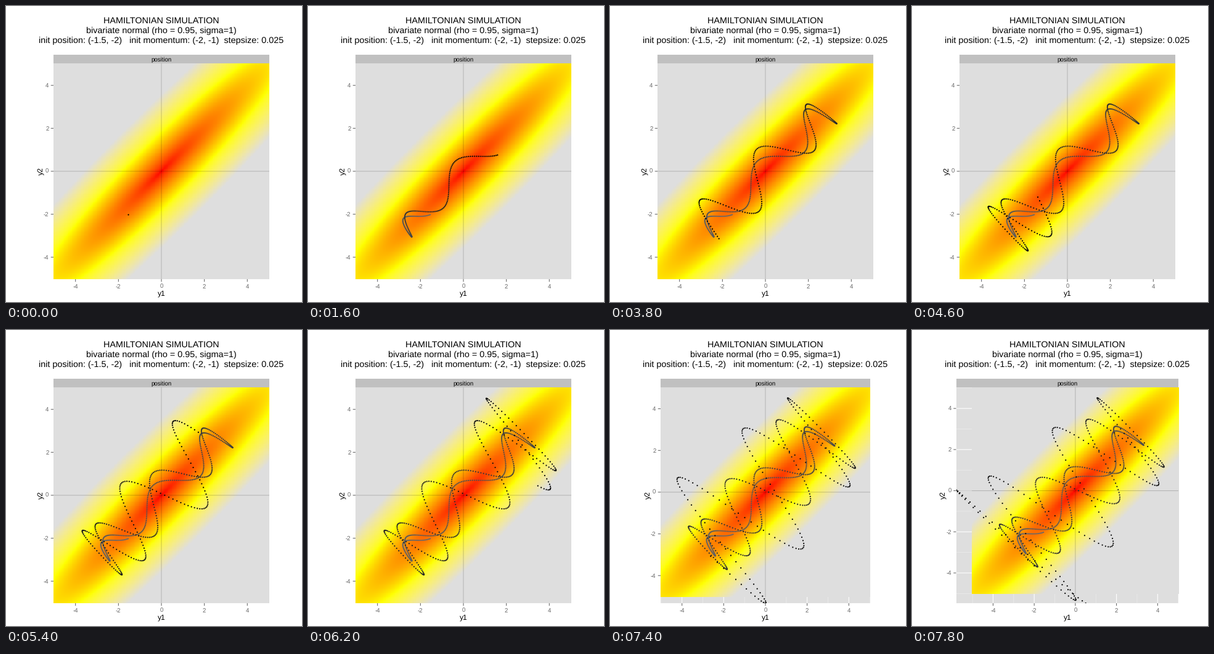
Animation of 480 by 480 pixels, one loop 8 s. Source, as a matplotlib script:

```python
import numpy as np
import matplotlib.pyplot as plt
from matplotlib.animation import FuncAnimation
from matplotlib.collections import LineCollection
from matplotlib.patches import Rectangle

SIZE, DPI = 480, 100
FRAMES, INTERVAL, PER_FRAME = 40, 200, 20
EPS, RHO = 0.025, 0.95
EDGE = 5.025                      # outer border of the tile grid
TOP, BOTTOM, MID = 93, 443, 252   # panel placement in pixels
STRIP_TOP = 79
PT = 72 / DPI
GREY = '#696969'
PANEL = '#dedede'

plt.rcParams['font.family'] = 'Liberation Sans'
plt.rcParams['text.hinting'] = 'none'


def simulate(steps):
    """Leapfrog whose second half step reuses the old gradient."""
    prec = np.linalg.inv([[1, RHO], [RHO, 1]])
    q, p = np.array([-1.5, -2.0]), np.array([-2.0, -1.0])
    path = []
    for _ in range(steps):
        grad = prec @ q
        p = p - EPS / 2 * grad
        q = q + EPS * p
        p = p - EPS / 2 * grad
        path.append(q)
    return np.array(path)


def lab_to_rgb(lab):
    fy = (lab[..., 0] + 16) / 116
    f = np.stack([fy + lab[..., 1] / 500, fy, fy - lab[..., 2] / 200], -1)
    xyz = np.where(f > 6 / 29, f ** 3, 3 * (6 / 29) ** 2 * (f - 4 / 29))
    xyz = xyz * [0.9505, 1.0, 1.089]
    m = np.array([[3.2406, -1.5372, -0.4986],
                  [-0.9689, 1.8758, 0.0415],
                  [0.0557, -0.2040, 1.0570]])
    lin = np.clip(xyz @ m.T, 0, 1)
    return np.where(lin > 0.0031308, 1.055 * lin ** (1 / 2.4) - 0.055, 12.92 * lin)


def heat_map():
    g = np.linspace(-5, 5, 201)
    x, y = np.meshgrid(g, g[::-1])
    r = np.sqrt((x * x - 2 * RHO * x * y + y * y) / (2 * (1 - RHO ** 2)))
    stops = np.array([[53.24, 80.09, 67.20], [97.14, -21.55, 94.48], [90.9, 0, 0]])
    lab = np.stack([np.interp(r, [0, 4.05, 8.1], stops[:, i]) for i in range(3)], -1)
    return np.clip(lab_to_rgb(lab) ** 1.27, 0, 1)


path = simulate(1 + PER_FRAME * (FRAMES - 1))
heat = heat_map()

fig = plt.figure(figsize=(SIZE / DPI, SIZE / DPI), dpi=DPI, facecolor='white')
ax = fig.add_axes([0, 0, 1, 1])


def label(x, y, s, px, color='black', ha='center', **kw):
    ax.text(x, y, s, fontsize=px * PT, color=color, ha=ha, va='baseline', **kw)


def draw(k):
    ax.clear()
    ax.axis('off')

    pts = path[:1 + PER_FRAME * k]
    x_lo, y_lo = np.minimum(pts.min(axis=0), -EDGE)
    scale = (BOTTOM - TOP) / (EDGE - y_lo)
    width = scale * (EDGE - x_lo)
    left, right = MID - width / 2, MID + width / 2

    def px(x):
        return left + (x - x_lo) * scale

    def py(y):
        return TOP + (EDGE - y) * scale

    def lines(xs, ys, color, lw, **kw):
        segs = [[(px(x), TOP), (px(x), BOTTOM)] for x in xs]
        segs += [[(left, py(y)), (right, py(y))] for y in ys]
        art = LineCollection(segs, colors=color, linewidths=lw * PT, snap=False, **kw)
        ax.add_collection(art)
        art.set_clip_path(panel)

    panel = Rectangle((left, TOP), width, BOTTOM - TOP, fc=PANEL, ec='none', zorder=0)
    ax.add_patch(panel)
    ax.add_patch(Rectangle((left, STRIP_TOP), width, TOP - STRIP_TOP,
                           fc='#c0c0c0', ec='none', zorder=0))

    odd, even = range(-5, 6, 2), range(-4, 5, 2)
    lines(odd, odd, '#efefef', 0.6, zorder=1)
    lines(even, even, 'white', 1.1, zorder=1)

    img = ax.imshow(heat, extent=(px(-EDGE), px(EDGE), py(-EDGE), py(EDGE)),
                    aspect='auto', interpolation='nearest', zorder=2)
    img.set_clip_path(panel)
    lines([0], [0], 'black', 1.1, alpha=0.18, zorder=3)

    # Older positions fade from black to grey
    age = np.linspace(1, 0, len(pts)) if len(pts) > 1 else np.zeros(1)
    shade = np.repeat(age[:, None] * 105 / 255, 3, axis=1)
    dots = ax.scatter(px(pts[:, 0]), py(pts[:, 1]), s=(2.2 * PT) ** 2,
                      c=shade, linewidths=0, zorder=4)
    dots.set_clip_path(panel)

    ticks = []
    for v in even:
        ticks.append([(left - 4.25, py(v)), (left, py(v))])
        ticks.append([(px(v), BOTTOM), (px(v), BOTTOM + 4.25)])
        label(left - 7.6, py(v) + 3.3, str(v), 9.6, GREY, 'right')
        label(px(v), 458, str(v), 9.6, GREY)
    ax.add_collection(LineCollection(ticks, colors=GREY, linewidths=1.07 * PT,
                                     snap=False))

    label(MID, 28, 'HAMILTONIAN SIMULATION', 14.4)
    label(MID, 44, 'bivariate normal (rho = 0.95, sigma=1)', 14.4)
    label(MID, 60, 'init position: (-1.5, -2)   init momentum: (-2, -1)'
                   '  stepsize: 0.025', 14.4)
    label(MID, 90, 'position', 9.6)
    label(MID, 469.5, 'y1', 12)
    ax.text(left - 18, (TOP + BOTTOM) / 2, 'y2', fontsize=12 * PT, rotation=90,
            rotation_mode='anchor', ha='center', va='baseline')

    ax.set_xlim(0, SIZE)
    ax.set_ylim(SIZE, 0)
    return []


anim = FuncAnimation(fig, draw, frames=FRAMES, interval=INTERVAL,
                     init_func=lambda: [], repeat=True, repeat_delay=0)
plt.show()
```
